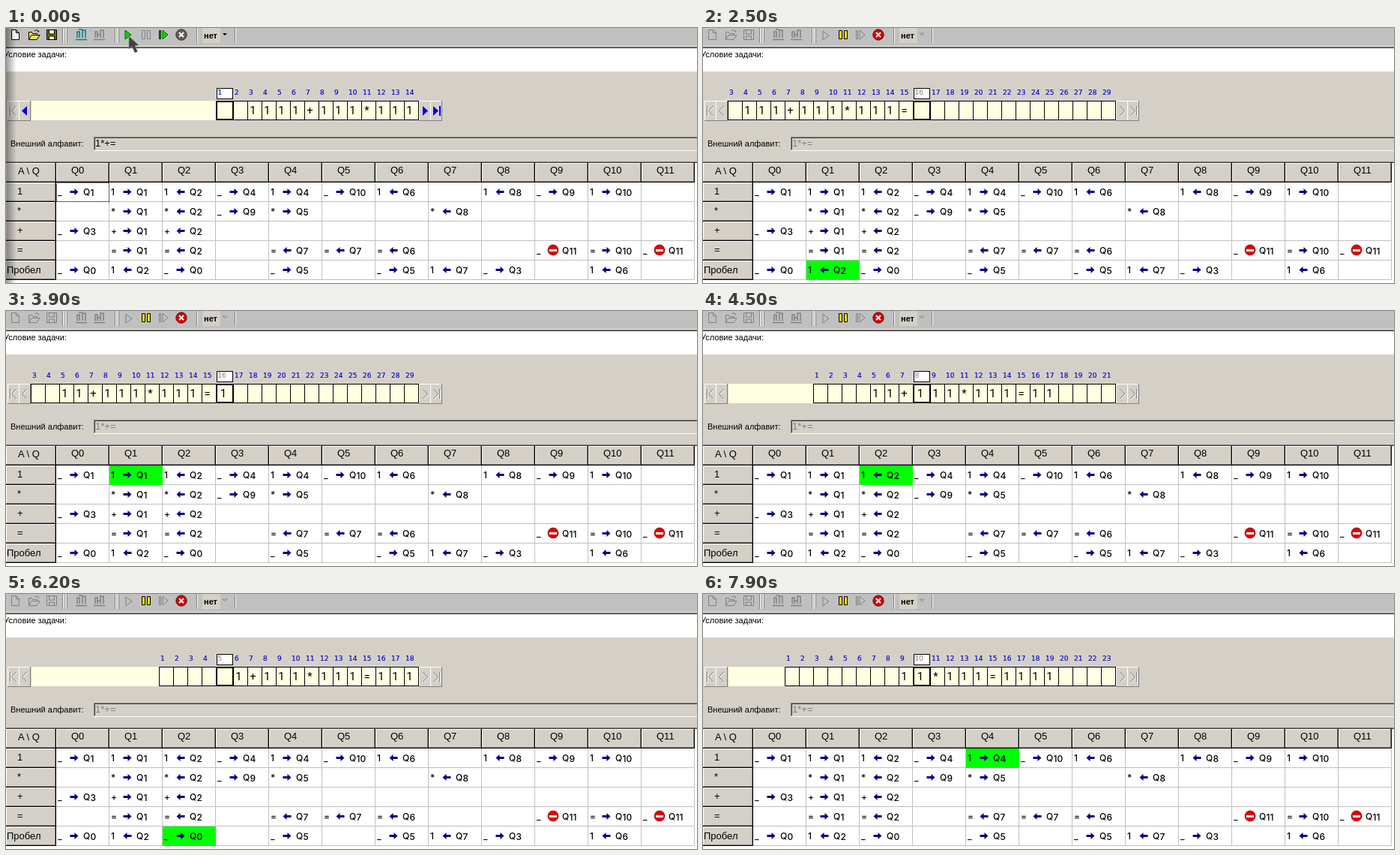
Animation of 922x340 px, one loop 8000 ms. Source, as an HTML page:

```html
<!DOCTYPE html>
<html lang="ru">
<head>
<meta charset="utf-8">
<style>
  html, body { margin: 0; width: 100%; height: 100%; overflow: hidden; background: #d4d0c8; }
  svg { display: block; width: 922px; height: 340px; }
  text { font-family: "Liberation Sans", Arial, sans-serif; white-space: pre; }
  .crisp { shape-rendering: crispEdges; }
  .label { font-size: 11px; }
  .head { font-size: 13px; }
  .rule { font: 500 12px Inter, "DejaVu Sans", sans-serif; }
  .num { font: 9px "DejaVu Sans", Verdana, sans-serif; fill: #0000c0; stroke: #0000c0; stroke-width: .15px; }
  .sym { font: 15px Roboto, Arial, sans-serif; text-anchor: middle; }
</style>
</head>
<body>
<svg viewBox="0 0 922 340">
  <defs>
    <linearGradient id="edge"><stop stop-color="#000" stop-opacity=".4"/><stop offset="1" stop-color="#000" stop-opacity="0"/></linearGradient>
  </defs>
  <g id="panel"></g>
  <g id="tools"></g>
  <g id="tape"></g>
  <g id="grid"></g>
  <rect id="mark" width="71" height="26" fill="#0f0" class="crisp"/>
  <g id="rules"></g>
  <rect id="focus" x="67.5" y="206.5" width="70" height="25" fill="none" stroke="#000" stroke-dasharray="1 1" class="crisp"/>
  <rect id="shade" width="14" height="340" fill="url(#edge)"/>
  <path id="cursor" d="M0 0V17L4 13.5L8 22L11.5 20.5L8 12.5L13 12Z" fill="#404040" stroke="#909090" stroke-width=".6"/>
</svg>
<script>
const $ = id => document.getElementById(id);
const GREY = '#808080', DARK = '#404040', FACE = '#d4d0c8', BAR = '#c0c0c0', BLUE = '#0000e0';

const SYMBOLS = '1*+=_';
const PROGRAM = [
  '_>1 1>1 1<2 _>4 1>4 _>10 1<6 - 1<8 _>9 1>10 -',
  '- *>1 *<2 _>9 *>5 - - *<8 - - - -',
  '_>3 +>1 +<2 - - - - - - - - -',
  '- =>1 =<2 - =<7 =<7 =<6 - - _.11 =>10 _.11',
  '_>0 1<2 _>0 - _>5 - _>5 1<7 _>3 - 1<6 -'
].map(row => row.split(' '));
const START = '__1111+111*111=';

const LOOP = 8000, FRAME = 100, RUN = 1600, FIRST = 1645, TICK = 54.925;
const COL = 71, ROW = 26, LEFT = 66, TOP = 206;
const CELL = 19, HEAD_X = 280, HEAD_W = 23;

const rect = (x, y, w, h, fill) =>
  `<rect class="crisp" x="${x}" y="${y}" width="${w}" height="${h}" fill="${fill}"/>`;
const text = (x, y, s, cls, extra = '') => `<text x="${x}" y="${y}" class="${cls}" ${extra}>${s}</text>`;
const path = (d, fill = 'none', stroke = 'none', w = 1) =>
  `<path d="${d}" fill="${fill}" stroke="${stroke}" stroke-width="${w}"/>`;
const raised = (x, y, w, h) =>
  rect(x, y, w, h, GREY) + rect(x, y, w - 1, h - 1, '#fff') + rect(x + 1, y + 1, w - 2, h - 2, FACE);
const separator = x => rect(x, 0, 1, 20, GREY) + rect(x + 1, 0, 1, 20, '#fff');
const grip = x => rect(x, 0, 1, 20, '#fff') + rect(x + 1, 0, 1, 20, GREY);

function drawPanel() {
  $('panel').innerHTML = rect(0, 0, 922, 340, FACE)
    + rect(0, 0, 922, 23, BAR) + rect(0, 25, 922, 1, GREY)
    + rect(0, 26, 922, 1, DARK) + rect(0, 27, 922, 31, '#fff')
    + [75, 145, 254, 305].map(separator).join('')
    + [80, 149].map(grip).join('')
    + rect(262, 0, 24, 20, FACE)
    + text(-3, 39, 'Условие задачи:', 'label')
    + text(6, 158, 'Внешний алфавит:', 'label')
    + rect(117, 145, 805, 1, GREY) + rect(117, 145, 1, 18, GREY)
    + rect(118, 146, 804, 1, DARK) + rect(118, 146, 1, 16, DARK)
    + rect(117, 163, 805, 1, '#fff');
}

function drawTools(running, pressed) {
  const ink = running ? GREY : '#000';
  const paint = color => running ? BAR : color;
  const nudge = pressed ? 1 : 0;
  const page = path('M7.5 2.5h6l4 4v9h-10zM13.5 2.5v4h4', paint('#fff'), ink);
  const folder = path('M30.5 15.5v-10h4l1 2h6v2M30.5 15.5l3.5-6h11l-4 6zM38 4q4-3 6 1l-2-.5', paint('#f0e060'), ink);
  const disk = path('M54.5 2.5h13v13h-13z', paint('#707000'), ink)
    + path('M57.5 3v5h7v-5M57.5 15v-4h7v4', paint('#fff'), ink);
  const link = (x, color, flip) => path(
    `M${x - 7} 15.5h15M${x - 5} 13V5h3v8M${x + 2} 13V3h4v10M${x - 3} ${flip ? 9 : 2}h5`, 'none', color, 1.5);
  const play = path(`M${159 + nudge} ${3 + nudge}l8 6l-8 6z`, paint('#00d800'), running ? GREY : '#006000');
  const pause = [181, 188].map(x =>
    path(`M${x + .5} 3.5h4v11h-4z`, running ? '#ffe000' : BAR, running ? '#000' : GREY)).join('');
  const step = path('M204.5 3.5h2v11h-2z', paint('#00d800'), ink)
    + path('M209 3l7 6l-7 6z', paint('#00d800'), running ? GREY : '#006000');
  const stop = `<circle cx="234" cy="9" r="7.2" fill="${running ? '#d80000' : '#606060'}" stroke="#400000" stroke-width=".8"/>`
    + path('M231 6l6 6M237 6l-6 6', 'none', '#fff', 2);
  const disabled = page + folder + disk + link(100, running ? GREY : '#008080') + link(124, GREY, true);
  $('tools').innerHTML = disabled + play + pause + step + stop
    + text(264, 14, 'нет', 'label', 'font-weight="bold"')
    + path('M289 7h6l-3 3z', running ? 'none' : '#000', running ? GREY : 'none', .8)
    + text(119, 158, '1*+=', 'head', `fill="${running ? GREY : '#000'}"`);
}

// Tape buttons: solid blue when active, an embossed chevron when not.
function navButton(x, dir, bar, on) {
  const edge = x - (bar ? dir * 1 : 0);
  if (on) {
    return raised(x - 8, 97, 16, 27) + path(`M${edge - dir * 3} 104l${dir * 7} 6.5l${-dir * 7} 6.5z`, BLUE)
      + (bar ? path(`M${x + dir * 5} 104v13`, 'none', BLUE, 2) : '');
  }
  const chevron = dx => `M${edge - dir * 2.5 + dx} ${104 + dx}l${dir * 6} 6.5l${-dir * 6} 6.5`
    + (bar ? `M${x + dir * 4.5 + dx} ${104 + dx}v13` : '');
  return raised(x - 8, 97, 16, 27) + path(chevron(1), 'none', '#fff') + path(chevron(0), 'none', GREY);
}

function drawTape({ tape, head }, running) {
  let out = navButton(10, -1, true, false) + navButton(25, -1, false, !running)
    + navButton(559, 1, false, !running) + navButton(574, 1, true, !running)
    + rect(34, 97, 517, 26, '#ffffe1');
  for (let n = Math.max(1, head - 13); n <= head + 13; n++) {
    const x = HEAD_X + (n - head) * CELL + (n > head ? HEAD_W - CELL : 0);
    const current = n === head;
    const sym = tape[n] || '_';
    if (current) {
      out += rect(x + 1, 80, 22, 15, '#000') + rect(x + 2, 81, 20, 13, '#fff');
    } else {
      out += rect(x, 97, CELL + 1, 26, '#000') + rect(x + 1, 98, CELL - 1, 24, '#ffffe1');
    }
    out += text(x + (current ? 2.5 : 2), 89, n, 'num', current && running ? `style="fill:${GREY};stroke:none"` : '');
    if (sym !== '_') out += text(x + (current ? 10 : 7.5), 114.5, sym, 'sym');
  }
  const box = `x="${HEAD_X + 1}" y="98" width="22" height="24"`;
  $('tape').innerHTML = out + `<rect class="crisp" ${box} fill="none" stroke="#000" stroke-width="2"/>`;
}

function drawTable() {
  let grid = rect(0, 178, 922, 162, '#fff') + rect(0, 178, 922, 1, GREY) + rect(0, 179, 922, 1, DARK);
  let rules = '';
  const header = (x, y, w, h) => rect(x, y, w, h, '#000') + raised(x, y, w - 1, h - 1);
  grid += header(0, 180, 67, 26) + text(16, 195, 'A \\ Q', 'head');
  for (let q = 0; q < 12; q++) {
    const x = LEFT + q * COL;
    grid += header(x + 1, 180, COL, 26) + text(x + 21, 194, 'Q' + q, 'head')
      + rect(x + COL, TOP, 1, 5 * ROW, '#c0c0c0');
  }
  PROGRAM.forEach((row, r) => {
    const y = TOP + r * ROW;
    const blank = SYMBOLS[r] === '_';
    grid += header(0, y, 67, ROW)
      + text(blank ? 1 : 15, y + (blank ? 17 : 16), blank ? 'Пробел' : SYMBOLS[r], 'head')
      + rect(67, y + ROW - 1, 852, 1, '#c0c0c0');
    row.forEach((rule, q) => {
      if (rule === '-') return;
      const x = LEFT + q * COL, [sym, move] = rule;
      rules += text(x + 3, y + 16.5, sym, 'rule') + text(x + 37, y + 16.5, 'Q', 'rule')
        + text(x + 46.5, y + 18, rule.slice(2), 'rule');
      if (move === '.') {
        rules += `<circle cx="${x + 25}" cy="${y + 12}" r="7" fill="#e00000" stroke="#800000" stroke-width=".7"/>`
          + rect(x + 20, y + 11, 10, 3, '#fff');
      } else {
        const dir = move === '>' ? 1 : -1;
        const cx = x + 25, cy = y + 12.5;
        rules += path(`M${cx - dir * 5.5} ${cy}h${dir * 7}`, 'none', '#000080', 3)
          + path(`M${cx + dir * 5.5} ${cy}l${-dir * 5} -4.5v9z`, '#000080');
      }
    });
  });
  $('grid').innerHTML = grid;
  $('rules').innerHTML = rules;
}

function machineAt(steps) {
  const m = { tape: ['_', ...START], head: 1, state: 0 };
  for (let i = 0; i < steps; i++) {
    const rule = PROGRAM[SYMBOLS.indexOf(m.tape[m.head] || '_')][m.state];
    m.tape[m.head] = rule[0];
    m.head += { '<': -1, '>': 1, '.': 0 }[rule[1]];
    m.state = +rule.slice(2);
  }
  return m;
}

function cursorAt(t) {
  if (t < 2400) {
    const p = Math.max(0, (t - 2000) / 400);
    return [164 + 136 * p, 11 - 31 * p * p];
  }
  return t >= 5100 && t < 5400 ? [386, -14] : null;
}

const show = (id, on) => $(id).setAttribute('visibility', on ? 'visible' : 'hidden');

function render(t) {
  const running = t >= RUN;
  const m = machineAt(Math.max(0, Math.floor((t - FIRST) / TICK)));
  drawTools(running, t >= 1500);
  drawTape(m, running);
  const row = SYMBOLS.indexOf(m.tape[m.head] || '_');
  $('mark').setAttribute('x', LEFT + 1 + m.state * COL);
  $('mark').setAttribute('y', TOP + row * ROW);
  show('mark', running);
  show('focus', !running);
  show('shade', t < 1500);
  const at = cursorAt(t);
  show('cursor', at);
  if (at) $('cursor').setAttribute('transform', `translate(${at})`);
}

let shown = -1;
function loop() {
  const t = Math.floor(performance.now() % LOOP / FRAME) * FRAME;
  if (t !== shown) render(shown = t);
  requestAnimationFrame(loop);
}

drawPanel();
drawTable();
loop();
</script>
</body>
</html>
```
